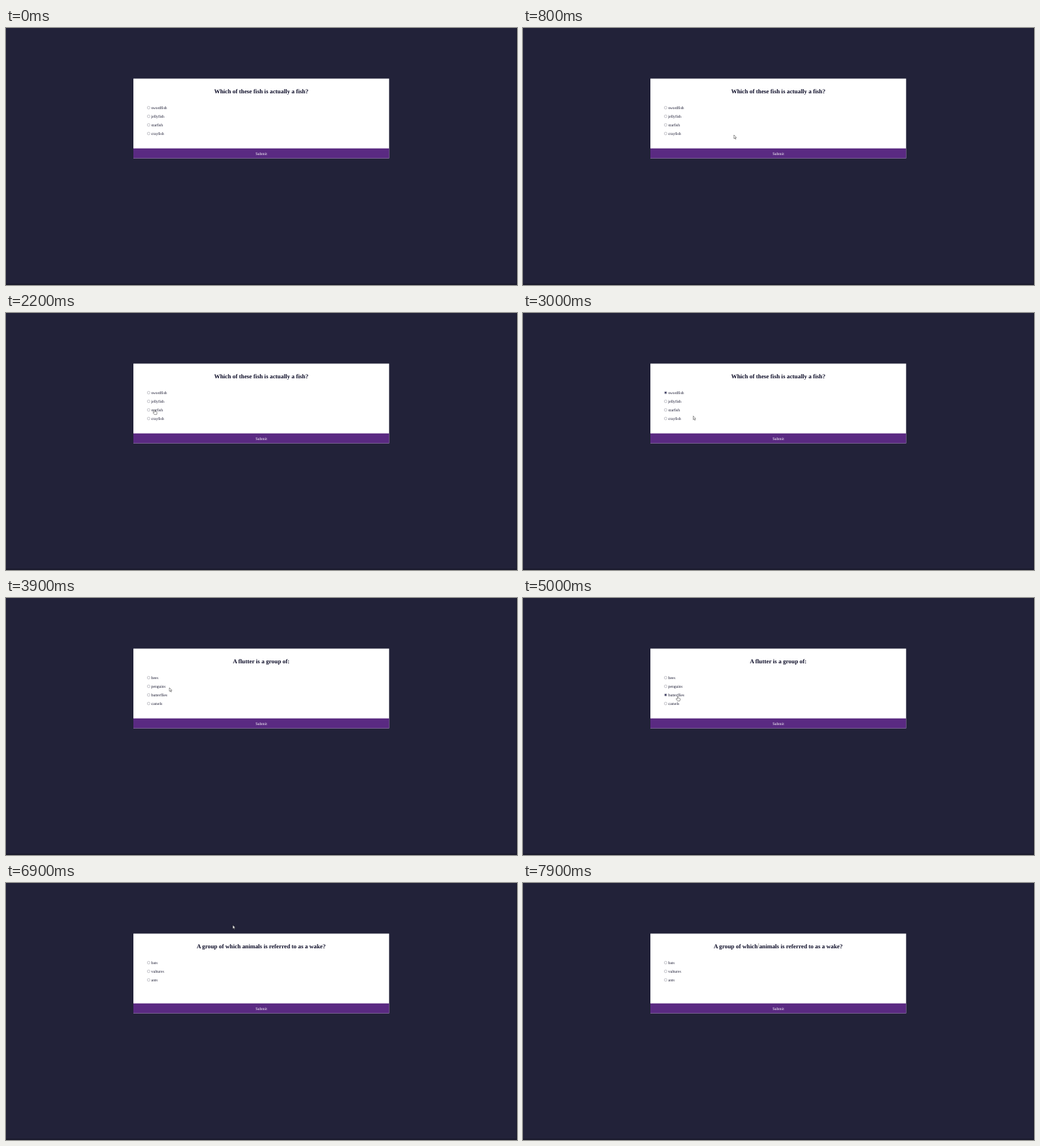
Write an HTML page that moves like this. It is 710 px wide and 358 px high and loops after 8000 ms.

```html
<!DOCTYPE html>
<html lang="en">
<head>
<meta charset="utf-8">
<title>Quiz</title>
<style>
  html, body { margin: 0; height: 100%; overflow: hidden; background: #222239; }
  svg { display: block; width: 710px; height: 358px; }
  text { font: 5.55px "Liberation Serif", "Times New Roman", serif; fill: #17172f; text-rendering: geometricPrecision; }
  #title { font-size: 8.32px; font-weight: bold; fill: #0b0b26; }
  .mid { text-anchor: middle; }
  .ring { fill: #fff; stroke: #767684; stroke-width: .4; }
  .dot { fill: #34345c; }
  #cursor path { fill: #fff; stroke: #111; stroke-width: 1.3; stroke-linejoin: round; }
</style>
</head>
<body>
<svg viewBox="0 0 710 358">
  <path d="M0 356H710V358H0ZM709 0H710V358H709Z" fill="#1b1b2d"/>
  <rect x="177" y="70.5" width="355.3" height="111" fill="#fff"/>
  <rect x="177" y="167.7" width="355.3" height="13.8" fill="#5a2a82"/>
  <text id="title" class="mid" x="354.6" y="90.6"></text>
  <g id="options"></g>
  <text class="mid" x="354.7" y="176.7" style="fill:#fff">Submit</text>
  <g id="cursor">
    <path data-kind="arrow" d="M0 0V16L4 12.5 6.5 18.5 9 17.5 6.5 11.5H11Z"/>
    <path data-kind="hand" d="M-2 1.5Q0-1 2 1.5V7L9 9Q11 10 11 12L9 20H-1L-7 12Q-7 9-4 10L-2 12Z"/>
    <path data-kind="beam" d="M0-8V8" style="stroke:#333"/>
  </g>
</svg>
<script>
const LOOP = 8000, STEP = 100, ROW = 12, TOP = 111;
const $ = id => document.getElementById(id);

const quiz = [
  { from: 0, title: "Which of these fish is actually a fish?",
    options: ["swordfish", "jellyfish", "starfish", "crayfish"], pick: 0, pickAt: 2600 },
  { from: 3600, title: "A flutter is a group of:",
    options: ["bees", "penguins", "butterflies", "camels"], pick: 2, pickAt: 4600 },
  { from: 5700, title: "A group of which animals is referred to as a wake?",
    options: ["bats", "vultures", "ants"], pick: -1 }
];

// Pointer path: time, x, y
const path = [
  [300, 400, 352], [800, 293, 149], [1100, 221, 125], [1300, 212, 123],
  [1700, 212, 123], [1800, 207, 123], [2100, 207, 123], [2200, 206.5, 135],
  [2400, 209, 111], [2600, 209, 111], [3400, 264, 176], [3600, 264, 176],
  [3900, 227, 125], [4300, 214, 136], [4500, 214, 136], [5000, 215, 137],
  [5300, 244, 162], [5500, 267.5, 177.3], [6500, 267.5, 177.3], [7000, 327, 29],
  [7500, 327, 29], [7600, 329, 17], [7900, 327.3, 86.5]
];

function pointer(t) {
  const i = path.findIndex(p => p[0] > t);
  if (i === 0) return null;
  if (i < 0) return path[path.length - 1].slice(1);
  const [a, b] = [path[i - 1], path[i]];
  const k = (t - a[0]) / (b[0] - a[0]);
  return [1, 2].map(n => a[n] + (b[n] - a[n]) * k);
}

function kindAt(x, y, count) {
  const row = Math.round((y - TOP) / ROW);
  const onLabel = x > 195 && x < 225 && row >= 0 && row < count && Math.abs(y - TOP - row * ROW) < 3;
  const onButton = x > 177 && x < 532 && y > 167.5 && y < 181.5;
  if (onLabel || onButton) return "hand";
  return x > 265 && x < 445 && y > 83 && y < 93 ? "beam" : "arrow";
}

const option = (label, i, checked) => {
  const y = TOP + i * ROW;
  return `<circle class="ring" cx="198.2" cy="${y}" r="1.9"/>` +
    (checked ? `<circle class="dot" cx="198.2" cy="${y}" r="1.25"/>` : "") +
    `<text x="201.7" y="${y + 1.9}">${label}</text>`;
};

let last = -1;
function draw(now) {
  requestAnimationFrame(draw);
  const t = Math.floor(now % LOOP / STEP) * STEP;
  if (t === last) return;
  last = t;
  const q = quiz.filter(item => item.from <= t).pop();
  $("title").textContent = q.title;
  $("options").innerHTML = q.options
    .map((label, i) => option(label, i, i === q.pick && t >= q.pickAt)).join("");
  const at = pointer(t), cursor = $("cursor");
  cursor.style.display = at ? "" : "none";
  if (!at) return;
  cursor.setAttribute("transform", `translate(${at}) scale(.32)`);
  const kind = kindAt(...at, q.options.length);
  for (const shape of cursor.children)
    shape.style.display = shape.dataset.kind === kind ? "" : "none";
}
draw(performance.now());
</script>
</body>
</html>
```
